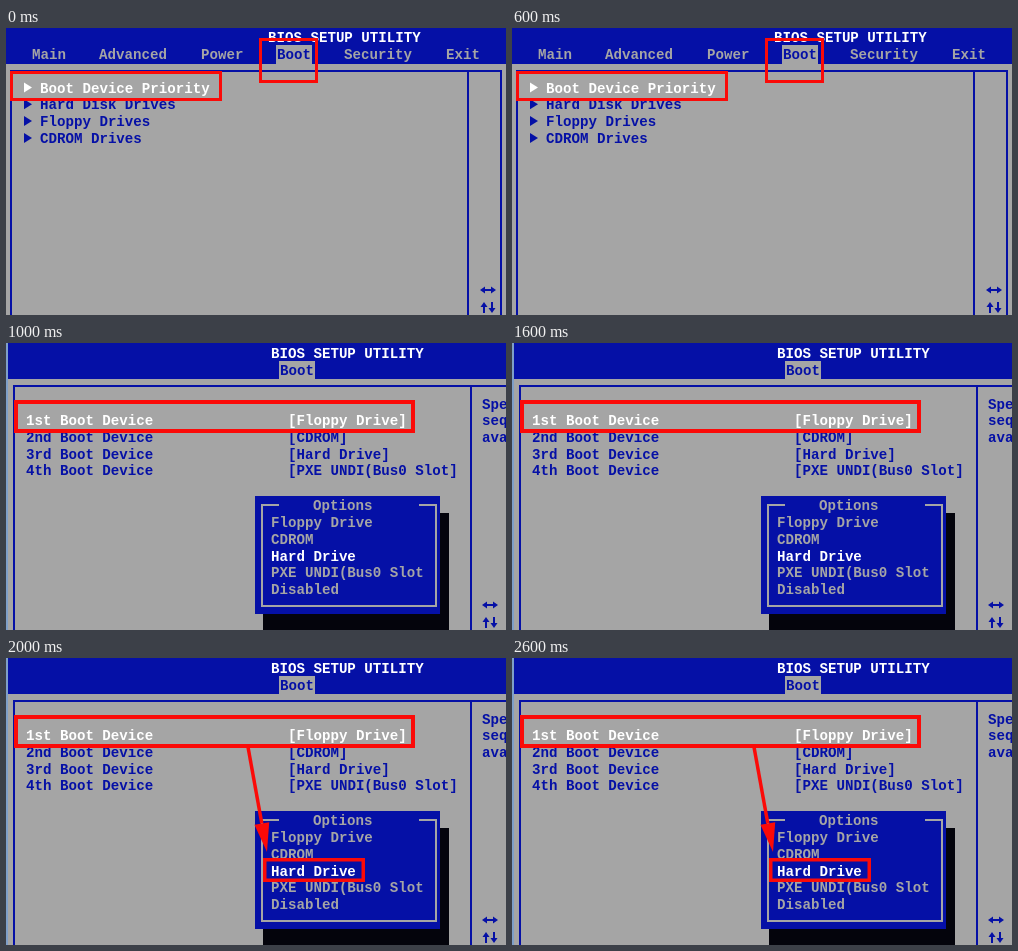
Recreate the animation shown at these times as an HTML page with a canvas. Size 500x287 px, loop 3000 ms.

```html
<!DOCTYPE html>
<html lang="en">
<head>
<meta charset="utf-8">
<title>BIOS boot order</title>
<style>
html, body { margin: 0; width: 100%; height: 100%; overflow: hidden; background: #a5a5a5; }
canvas { display: block; }
</style>
</head>
<body>
<canvas width="500" height="287"></canvas>
<script>
const ctx = document.querySelector('canvas').getContext('2d');
const BLUE = '#0510a6', GRAY = '#a5a5a5', WHITE = '#fff', BLACK = '#04040c', RED = '#fb0a08';
const ROW = 16.8;

function fill(color, x, y, w, h) {
  ctx.fillStyle = color;
  ctx.fillRect(x, y, w, h);
}

function text(str, x, y, color = BLUE) {
  ctx.fillStyle = color;
  ctx.fillText(str, x, y);
}

function line(color, width, ...points) {
  ctx.strokeStyle = color;
  ctx.lineWidth = width;
  ctx.beginPath();
  for (const [x, y] of points) ctx.lineTo(x, y);
  ctx.stroke();
}

function triangle(color, ...points) {
  ctx.fillStyle = color;
  ctx.beginPath();
  for (const [x, y] of points) ctx.lineTo(x, y);
  ctx.fill();
}

function arrow(color, width, x1, y1, x2, y2, headLength, headWidth) {
  const length = Math.hypot(x2 - x1, y2 - y1);
  const ux = (x2 - x1) / length, uy = (y2 - y1) / length;
  const bx = x2 - ux * headLength, by = y2 - uy * headLength;
  const dx = -uy * headWidth / 2, dy = ux * headWidth / 2;
  line(color, width, [x1, y1], [bx, by]);
  triangle(color, [bx + dx, by + dy], [x2, y2], [bx - dx, by - dy]);
}

// Red highlight given by its outer edges
function mark(left, top, right, bottom, width = 3) {
  ctx.strokeStyle = RED;
  ctx.lineWidth = width;
  ctx.strokeRect(left + width / 2, top + width / 2, right - left - width, bottom - top - width);
}

function keyHints(x, y) {
  const key = (...ends) => arrow(BLUE, 2, ...ends, 5, 7);
  key(x + 8, y, x, y);
  key(x + 8, y, x + 16, y);
  key(x + 4, y + 23, x + 4, y + 12);
  key(x + 12, y + 12, x + 12, y + 23);
}

// Header with the selected tab, and panel borders
function screen({ titleX, titleY, barEnd, tabX, left, top, split, right, keysX }) {
  fill(GRAY, 0, 0, 500, 287);
  fill(BLUE, 0, 0, 500, barEnd);
  fill(GRAY, tabX - 1, titleY + 3, 36, barEnd - titleY - 3);
  text('BIOS SETUP UTILITY', titleX, titleY, WHITE);
  text('Boot', tabX, titleY + 17);
  line(BLUE, 2, [left, 287], [left, top], [right, top], [right, 287]);
  line(BLUE, 2, [split, top], [split, 287]);
  keyHints(keysX, 262);
}

function bootMenu() {
  screen({ titleX: 262, titleY: 14, barEnd: 36, tabX: 271,
    left: 5, top: 43, split: 462, right: 495, keysX: 474 });
  const tabs = { Main: 26, Advanced: 93, Power: 195, Security: 338, Exit: 440 };
  for (const name in tabs) text(name, tabs[name], 31, GRAY);
  ['Boot Device Priority', 'Hard Disk Drives', 'Floppy Drives', 'CDROM Drives'].forEach((item, i) => {
    const color = i ? BLUE : WHITE, y = 64.5 + i * ROW;
    triangle(color, [18, y - 10], [26, y - 5], [18, y]);
    text(item, 34, y, color);
  });
  mark(4, 43, 216, 73);
  mark(253, 10, 312, 55);
}

function devicePriority() {
  screen({ titleX: 265, titleY: 15, barEnd: 36, tabX: 274,
    left: 8, top: 43, split: 465, right: 510, keysX: 476 });
  fill('#7f9fc8', 0, 0, 2, 287);
  const devices = ['Floppy Drive', 'CDROM', 'Hard Drive', 'PXE UNDI(Bus0 Slot'];
  ['1st', '2nd', '3rd', '4th'].forEach((place, i) => {
    const color = i ? BLUE : WHITE, y = 82 + i * ROW;
    text(place + ' Boot Device', 20, y, color);
    text('[' + devices[i] + ']', 282, y, color);
  });
  ['Spe', 'seq', 'ava'].forEach((part, i) => text(part, 476, 65.5 + i * ROW));

  fill(BLACK, 257, 170, 186, 117);
  fill(BLUE, 249, 153, 185, 118);
  line(GRAY, 2, [273, 162], [256, 162], [256, 263], [430, 263], [430, 162], [413, 162]);
  text('Options', 307, 167, GRAY);
  [...devices, 'Disabled'].forEach((item, i) =>
    text(item, 265, 184 + i * ROW, item === 'Hard Drive' ? WHITE : GRAY));
  mark(8, 57, 409, 90, 4);
}

function pickHardDrive() {
  devicePriority();
  arrow(RED, 3.5, 242, 89, 261, 194, 29, 15);
  mark(257, 200, 359, 224, 3.5);
}

const scenes = [bootMenu, devicePriority, pickHardDrive];

function draw() {
  ctx.font = 'bold 14.15px "Liberation Mono", monospace';
  scenes[Math.floor(performance.now() % 3000 / 1000)]();
  requestAnimationFrame(draw);
}
draw();
</script>
</body>
</html>
```
